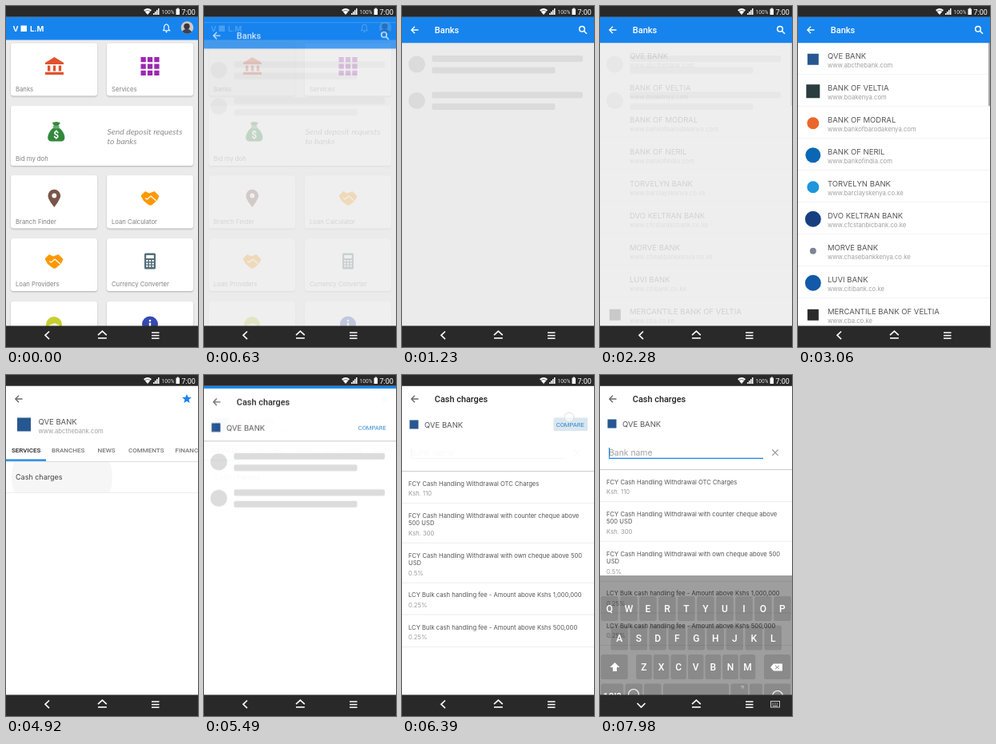
These frames come from a looping animation (240 px wide and 427 px high, 8 s). An HTML page with a canvas:

```html
<!DOCTYPE html>
<html lang="en">
<head>
<meta charset="utf-8">
<title>Banking app walkthrough</title>
<style>
html, body { margin: 0; width: 100%; height: 100%; overflow: hidden; background: #000; }
canvas { display: block; width: 100vw; height: 100vh; }
</style>
</head>
<body>
<canvas id="stage"></canvas>
<script>
const W = 240, H = 427, LOOP = 8000, TOP = 13.5, BOTTOM = 400.4;
const BLUE = '#1784ee', GREY = '#ebebeb', WHITE = '#fff', DARK = '#292929';
const BODY = 'Inter, sans-serif', UI = 'Roboto, sans-serif';
const ratio = Math.max(1, window.devicePixelRatio || 1);

function makeContext(canvas) {
  canvas.width = W * ratio;
  canvas.height = H * ratio;
  const ctx = canvas.getContext('2d');
  ctx.scale(ratio, ratio);
  return ctx;
}
const screen = makeContext(document.getElementById('stage'));
const buffer = makeContext(document.createElement('canvas'));
let g = screen;

const progress = (t, from, to) => Math.min(1, Math.max(0, (t - from) / (to - from)));
const easeOut = p => 1 - (1 - p) ** 2;

function text(str, x, y, size, color, weight = 400, family = BODY, align = 'left') {
  g.font = `${weight} ${size}px ${family}`;
  g.fillStyle = color;
  g.textAlign = align;
  g.fillText(str, x, y);
}
function rect(x, y, w, h, color, r = 0) {
  g.fillStyle = color;
  g.beginPath();
  g.roundRect(x, y, w, h, r);
  g.fill();
}
function circle(x, y, r, color) {
  g.fillStyle = color;
  g.beginPath();
  g.arc(x, y, r, 0, 7);
  g.fill();
}
function trace(points) {
  g.beginPath();
  points.forEach(([x, y]) => g.lineTo(x, y));
}
function poly(color, ...points) {
  trace(points);
  g.fillStyle = color;
  g.fill();
}
function line(color, width, ...points) {
  trace(points);
  g.strokeStyle = color;
  g.lineWidth = width;
  g.stroke();
}
function ring(x, y, r, color, width) {
  g.beginPath();
  g.arc(x, y, r, 0, 7);
  g.strokeStyle = color;
  g.lineWidth = width;
  g.stroke();
}
function fade(alpha, draw) {
  if (alpha <= 0) return;
  g.save();
  g.globalAlpha *= alpha;
  draw();
  g.restore();
}
function at(x, y, draw) {
  g.save();
  g.translate(x, y);
  draw();
  g.restore();
}
// Draws a group as one picture, so that it fades as a whole.
function layer(alpha, dy, draw) {
  if (alpha <= 0) return;
  if (alpha >= 1 && !dy) return draw();
  const main = g;
  g = buffer;
  g.clearRect(0, 0, W, H);
  draw();
  g = main;
  fade(alpha, () => g.drawImage(buffer.canvas, 0, dy, W, H));
}
function slideIn(p, draw) {
  if (p <= 0) return;
  const dy = 34 * (1 - p) ** 2;
  rect(0, TOP, W, dy, BLUE);
  layer(Math.min(1, p * 1.45), dy, draw);
}

function backArrow(color) {
  line(color, 1.3, [20.5, 30], [12, 30]);
  line(color, 1.3, [16, 25.8], [11.8, 30], [16, 34.2]);
}
function skeleton(y, shade) {
  const color = `rgba(0,0,0,${shade})`;
  for (const top of [y, y + 45.5]) {
    circle(18.5, top + 11, 10.5, color);
    rect(37.5, top, 188.5, 8, color, 2);
    rect(37.5, top + 14.5, 154, 8, color, 2);
  }
}

function statusBar() {
  rect(0, 0, W, TOP, DARK);
  poly(WHITE, [177, 11], [172, 5], [174.5, 3.4], [177, 3], [179.5, 3.4], [182, 5]);
  line(DARK, .6, [173.5, 6.6], [177, 5.4], [180.5, 6.6]);
  for (let i = 0; i < 4; i++) rect(184 + i * 2, 9 - i * 2, 1.5, 2 + i * 2, WHITE);
  text('100%', 194.5, 9.6, 6.6, '#ddd', 400, UI);
  rect(212.5, 3.5, 4.5, 7.5, WHITE, .6);
  rect(213.8, 2.5, 2, 1.2, WHITE);
  text('7:00', 219.5, 10.6, 9, WHITE, 400, UI);
}
function navBar(typing) {
  rect(0, BOTTOM, W, H - BOTTOM, DARK);
  if (typing) {
    line(WHITE, 1.7, [46.5, 411], [51.5, 416], [56.5, 411]);
    g.strokeStyle = '#ccc';
    g.lineWidth = 1;
    g.strokeRect(213.5, 408.5, 11, 7.5);
    for (const y of [410.5, 412.5])
      for (let x = 215; x < 223; x += 2) rect(x, y, 1.1, 1.1, '#ccc');
    rect(216, 414.3, 6, .9, '#ccc');
  } else line(WHITE, 1.7, [54, 407.5], [49, 412.3], [54, 417.2]);
  line(WHITE, 1.6, [115, 412.2], [120.4, 407.2], [125.8, 412.2]);
  line(WHITE, 1.6, [115, 415.9], [125.8, 415.9]);
  for (const y of [409, 412.6, 416.2]) line(WHITE, 1.5, [182, y], [191.5, y]);
}

function bankIcon() {
  const c = '#e2512f';
  poly(c, [-11.5, -3.5], [0, -10.5], [11.5, -3.5], [11.5, -1.6], [-11.5, -1.6]);
  for (const x of [-8.5, -1.6, 5.3]) rect(x, 0, 3.3, 7, c);
  rect(-11.5, 8.3, 23, 3.2, c);
}
function gridIcon() {
  for (let i = 0; i < 9; i++) rect(-11.5 + i % 3 * 8.4, -11.5 + (i / 3 | 0) * 8.4, 6.3, 6.3, '#9c27b0');
}
function moneyBag() {
  const c = '#31883c';
  poly(c, [-5, -11.5], [0, -12.5], [5, -11.5], [2.7, -7.5], [-2.7, -7.5]);
  rect(-3.7, -7, 7.4, 1.6, c);
  g.beginPath();
  g.moveTo(-3.5, -5);
  g.bezierCurveTo(-8, -2, -11, 4, -10.5, 8);
  g.quadraticCurveTo(-10, 12, -6, 12);
  g.lineTo(6, 12);
  g.quadraticCurveTo(10, 12, 10.5, 8);
  g.bezierCurveTo(11, 4, 8, -2, 3.5, -5);
  g.fill();
  text('$', 0, 8, 12, WHITE, 700, UI, 'center');
}
function pinIcon() {
  g.fillStyle = '#795548';
  g.beginPath();
  g.arc(0, -2.5, 7.8, Math.PI * .87, Math.PI * 2.13);
  g.quadraticCurveTo(5, 6, 0, 12);
  g.quadraticCurveTo(-5, 6, -7.2, 1);
  g.fill();
  circle(0, -2.5, 2.9, WHITE);
}
function handshake() {
  poly('#ff9800', [-11.5, -3], [-6, -8.5], [-1, -6], [5.5, -8.5], [11.5, -2.5], [9, 3], [2, 9], [-1, 9], [-8, 3.5]);
  line(WHITE, 1.3, [-6, 0], [-3.5, 1.5], [1, -2.5], [8, 3.5]);
}
function calculator() {
  rect(-7, -10, 14, 20, '#546e7a', 1.5);
  rect(-4.8, -7.5, 9.6, 4, WHITE, .5);
  for (let i = 0; i < 9; i++) rect(-4.8 + i % 3 * 3.7, -1.5 + (i / 3 | 0) * 3.4, 2.2, 2, WHITE);
}
function supportIcon() {
  circle(0, 0, 10, '#c6cf2e');
  circle(0, 2, 6.6, '#f5f3dc');
  poly('#c6cf2e', [-7, 1], [-5, -5], [3, -6], [7, 1], [1, -2]);
}
function infoIcon() {
  circle(0, 0, 10, '#3549b0');
  circle(0, -4.5, 1.3, WHITE);
  rect(-1.2, -2, 2.4, 7, WHITE);
}
function card(x, y, w, h, label, icon, ix, iy) {
  g.save();
  g.shadowColor = 'rgba(0,0,0,.25)';
  g.shadowBlur = 2 * ratio;
  g.shadowOffsetY = ratio;
  rect(x, y, w, h, WHITE, 3);
  g.restore();
  text(label, x + 6, y + h - 6, 7.7, '#808080');
  at(ix, iy, icon);
}
function home(t) {
  rect(0, 0, W, H, GREY);
  card(6, 46.5, 108, 66, 'Banks', bankIcon, 60.5, 74.5);
  card(126, 46.5, 108, 66, 'Services', gridIcon, 180, 75.5);
  card(6, 125, 228, 75, 'Bid my doh', moneyBag, 62.8, 157.5);
  text('Send deposit requests', 126.5, 161, 10.4, '#8d8d8d', 'italic 400', 'Lato, sans-serif');
  text('to banks', 126.5, 173, 10.4, '#8d8d8d', 'italic 400', 'Lato, sans-serif');
  card(6, 212, 108, 66.5, 'Branch Finder', pinIcon, 60.3, 240);
  card(126, 212, 108, 66.5, 'Loan Calculator', handshake, 180, 240.5);
  card(6, 291, 108, 66, 'Loan Providers', handshake, 60, 319.5);
  card(126, 291, 108, 66, 'Currency Converter', calculator, 180, 319.5);
  card(6, 370, 108, 66, '', supportIcon, 60, 399);
  card(126, 370, 108, 66, '', infoIcon, 180, 398.5);

  const press = progress(t, 20, 420);
  if (press > 0) {
    g.save();
    g.beginPath();
    g.roundRect(6, 46.5, 108, 66, 3);
    g.clip();
    circle(60, 80, 12 + 60 * easeOut(press), 'rgba(0,0,0,.1)');
    g.restore();
  }

  rect(0, TOP, W, 29, BLUE);
  text('V', 8.5, 32, 9.5, WHITE, 700);
  rect(18.5, 24.5, 7.5, 7.5, WHITE);
  text('L.M', 30, 32, 9.5, WHITE, 700);
  line(WHITE, 1.1, [196.3, 30.7], [197.7, 29], [197.7, 25.5], [199, 23.4], [200.5, 22.8], [202, 23.4], [203.3, 25.5], [203.3, 29], [204.7, 30.7], [196.3, 30.7]);
  circle(200.5, 32.3, 1.1, WHITE);
  g.save();
  g.beginPath();
  g.arc(226.5, 27, 7.8, 0, 7);
  g.clip();
  rect(218, 19, 17, 17, '#d2c8c2');
  circle(226, 25.5, 3.7, '#393440');
  circle(226, 35.5, 6.8, '#394354');
  g.restore();
}

// name, web address, logo colour, logo size, round?
const banks = [
  ['QVE BANK', 'www.abcthebank.com', '#275791', 14, 0],
  ['BANK OF VELTIA', 'www.boakenya.com', '#2b3d3e', 17, 0],
  ['BANK OF MODRAL', 'www.bankofbarodakenya.com', '#ea672b', 15, 1],
  ['BANK OF NERIL', 'www.bankofindia.com', '#0967b5', 19, 1],
  ['TORVELYN BANK', 'www.barclayskenya.co.ke', '#1f95dc', 15, 1],
  ['DVO KELTRAN BANK', 'www.cfcstanbicbank.co.ke', '#173f80', 20, 1],
  ['MORVE BANK', 'www.chasebankkenya.co.ke', '#7d8496', 8, 1],
  ['LUVI BANK', 'www.citibank.co.ke', '#1259a8', 20, 1],
  ['MERCANTILE BANK OF VELTIA', 'www.cba.co.ke', '#2a2a2a', 14, 0]
];
function logo([, , color, size, round], x, y, s = size) {
  rect(x - s / 2, y - s / 2, s, s, color, round ? s / 2 : 0);
}
function bankName(name, x, y) {
  text(name, x, y, 9.5, '#555');
}
function bankList(t) {
  rect(0, 46, W, H, WHITE);
  banks.forEach((bank, i) => {
    const y = 66 + i * 40;
    fade(i < 8 ? progress(t, 2560 + i * 30, 2800 + i * 37) : 1, () => logo(bank, 18.8, y + .7));
    bankName(bank[0], 37, y);
    text(bank[1], 37, y + 10.5, 7.7, '#a0a0a0');
    rect(0, y + 19, W, .7, '#f0f0f0');
  });
  rect(238, 46, 2, 79, '#a8a8a8');
}
function bankScreen(t) {
  rect(0, TOP, W, H, GREY);
  const beat = Math.sin(Math.PI * progress(t, 840, 1590));
  skeleton(62, .038 + .03 * beat);
  layer(progress(t, 2250, 2430), 0, () => bankList(t));
  rect(0, TOP, W, 32.8, BLUE);
  backArrow(WHITE);
  text('Banks', 40.8, 34, 11, WHITE, 500, UI);
  ring(225, 28.8, 3.3, WHITE, 1.5);
  line(WHITE, 1.6, [227.4, 31.2], [231, 34.8]);
}

function star(x, y, r) {
  const points = Array.from({ length: 10 }, (_, i) => {
    const a = i * Math.PI / 5 - Math.PI / 2, d = i % 2 ? r * .43 : r;
    return [x + d * Math.cos(a), y + d * Math.sin(a)];
  });
  poly(BLUE, ...points);
}
const tabs = [['SERVICES', 7], ['BRANCHES', 57], ['NEWS', 114.5], ['COMMENTS', 153], ['FINANCIALS', 211.5]];
function detailScreen(t) {
  rect(0, TOP, W, H, GREY);
  if (t < 4740) skeleton(121.5, .038);
  else {
    rect(0, 108, W, H, WHITE);
    text('Cash charges', 12, 131, 9, '#444');
    rect(0, 147, W, .8, '#e8e8e8');
    fade(progress(t, 4880, 4980), () => {
      g.save();
      g.beginPath();
      g.rect(0, 108, W, 39);
      g.clip();
      circle(70, 128, 20 + 190 * easeOut(progress(t, 4880, 5220)), 'rgba(0,0,0,.09)');
      g.restore();
    });
  }
  rect(0, 108, W, .8, '#d2d2d2');
  rect(0, TOP, W, 94.5, WHITE);
  backArrow('#666');
  logo(banks[0], 22.5, 62, 17);
  bankName(banks[0][0], 40.5, 62);
  text(banks[0][1], 40.5, 73, 7.7, '#a0a0a0');
  fade(progress(t, 3480, 3960), () => {
    star(226, 30, 6.2);
    tabs.forEach(([name, x], i) => text(name, x, 97, 8, i ? '#777' : '#222', 500, UI));
    rect(0, 105.5, 50 * easeOut(progress(t, 3510, 3900)), 2.2, BLUE);
  });
}

// lines of the title, amount, first baseline
const charges = [
  [['FCY Cash Handling Withdrawal OTC Charges'], 'Ksh. 110', 138.5],
  [['FCY Cash Handling Withdrawal with counter cheque above', '500 USD'], 'Ksh. 300', 179],
  [['FCY Cash Handling Withdrawal with own cheque above 500', 'USD'], '0.5%', 229],
  [['LCY Bulk cash handling fee - Amount above Kshs 1,000,000'], '0.25%', 278],
  [['LCY Bulk cash handling fee - Amount above Kshs 500,000'], '0.25%', 318.5]
];
function chargeList() {
  rect(0, 120, W, 1, '#cdcdcd');
  for (const [lines, amount, y] of charges) {
    lines.forEach((str, i) => text(str, 8, y + i * 9.3, 7.65, '#555'));
    const last = y + (lines.length - 1) * 9.3;
    text(amount, 8, last + 12.8, 7.65, '#999');
    rect(0, last + 21.5, W, .9, '#eee');
  }
}
function searchField() {
  rect(11, 91, 1.2, 12.5, BLUE);
  text('Bank name', 11, 101, 10.4, '#a0a0a0');
  rect(11, 103.7, 193, 1.3, BLUE);
  line('#999', 1.1, [215.3, 93.5], [222.7, 100.9]);
  line('#999', 1.1, [222.7, 93.5], [215.3, 100.9]);
}
function chargeScreen(t) {
  const settle = easeOut(progress(t, 7140, 7500));
  rect(0, TOP, W, H, WHITE);
  backArrow('#666');
  text('Cash charges', 40.8, 34, 10.9, '#222', 500, UI);
  at(0, -settle, () => {
    logo(banks[0], 15, 62, 11);
    bankName(banks[0][0], 28, 66);
  });
  const press = progress(t, 6180, 6330) * (1 - progress(t, 6420, 6480));
  fade(press, () => {
    rect(189.5, 53.5, 42.5, 16.5, '#dbe6ee', 1);
    circle(209, 53, 6, 'rgba(255,255,255,.6)');
    ring(209, 53, 6, '#d5d5d5', .8);
  });
  fade(1 - progress(t, 6500, 6990), () => text('COMPARE', 192.7, 65.3, 7.6, '#2a86d0', 400, UI));
  if (t < 5700) {
    rect(0, 78.5, W, 1, '#c6c6c6');
    skeleton(94, .14);
  } else {
    at(0, -2 * settle, () => fade(progress(t, 5670, 5880), chargeList));
    fade(.06 * progress(t, 5700, 6000) + .94 * progress(t, 7110, 7680), searchField);
  }
}

function key(label, x, y, w = 21.5) {
  rect(x, y, w, 31, 'rgba(0,0,0,.13)', 2.5);
  text(label, x + w / 2, y + 20, 12, WHITE, 500, UI, 'center');
}
function keyboard() {
  rect(0, 251, W, H, 'rgba(0,0,0,.38)');
  [...'QWERTYUIOP'].forEach((c, i) => key(c, 1.2 + i * 24, 277));
  [...'ASDFGHJKL'].forEach((c, i) => key(c, 13.5 + i * 24, 313.5));
  key('', 1.2, 350, 33.5);
  [...'ZXCVBNM'].forEach((c, i) => key(c, 45.2 + i * 21.6, 350, 19.5));
  key('', 205, 350, 33);
  poly(WHITE, [18.5, 360], [24.5, 366], [21, 366], [21, 371], [16, 371], [16, 366], [12.5, 366]);
  poly(WHITE, [213, 366], [217, 361.5], [228, 361.5], [228, 370.5], [217, 370.5]);
  line('#888', 1, [219, 363.8], [224, 368.3]);
  line('#888', 1, [224, 363.8], [219, 368.3]);
  key('12!?', 1.2, 386.5, 28);
  key('', 31.5, 386.5);
  ring(42, 400, 6.5, WHITE, 1.2);
  key('', 55, 386.5);
  key('', 79, 386.5, 82);
  key('', 163.5, 386.5);
  text('?!', 178, 393, 5.5, '#eee', 400, UI, 'center');
  key('', 187, 386.5, 16);
  key('', 205, 386.5, 33);
  ring(222, 402, 6.5, WHITE, 1.2);
}

function draw(t) {
  g.save();
  g.beginPath();
  g.rect(0, TOP, W, H);
  g.clip();
  if (t < 810) {
    home(t);
    slideIn(progress(t, 420, 810), () => bankScreen(t));
  } else if (t < 3360) {
    bankScreen(t);
    slideIn(progress(t, 3180, 3360), () => detailScreen(t));
  } else if (t < 5610) {
    detailScreen(t);
    slideIn(progress(t, 5250, 5610), () => chargeScreen(t));
  } else chargeScreen(t);
  if (t >= 7860) {
    const rise = progress(t, 7800, 7980);
    layer(rise, 20 * (1 - rise), keyboard);
  }
  g.restore();
  statusBar();
  navBar(t >= 7860);
}

function tick() {
  draw(performance.now() % LOOP);
  requestAnimationFrame(tick);
}
tick();
</script>
</body>
</html>
```
